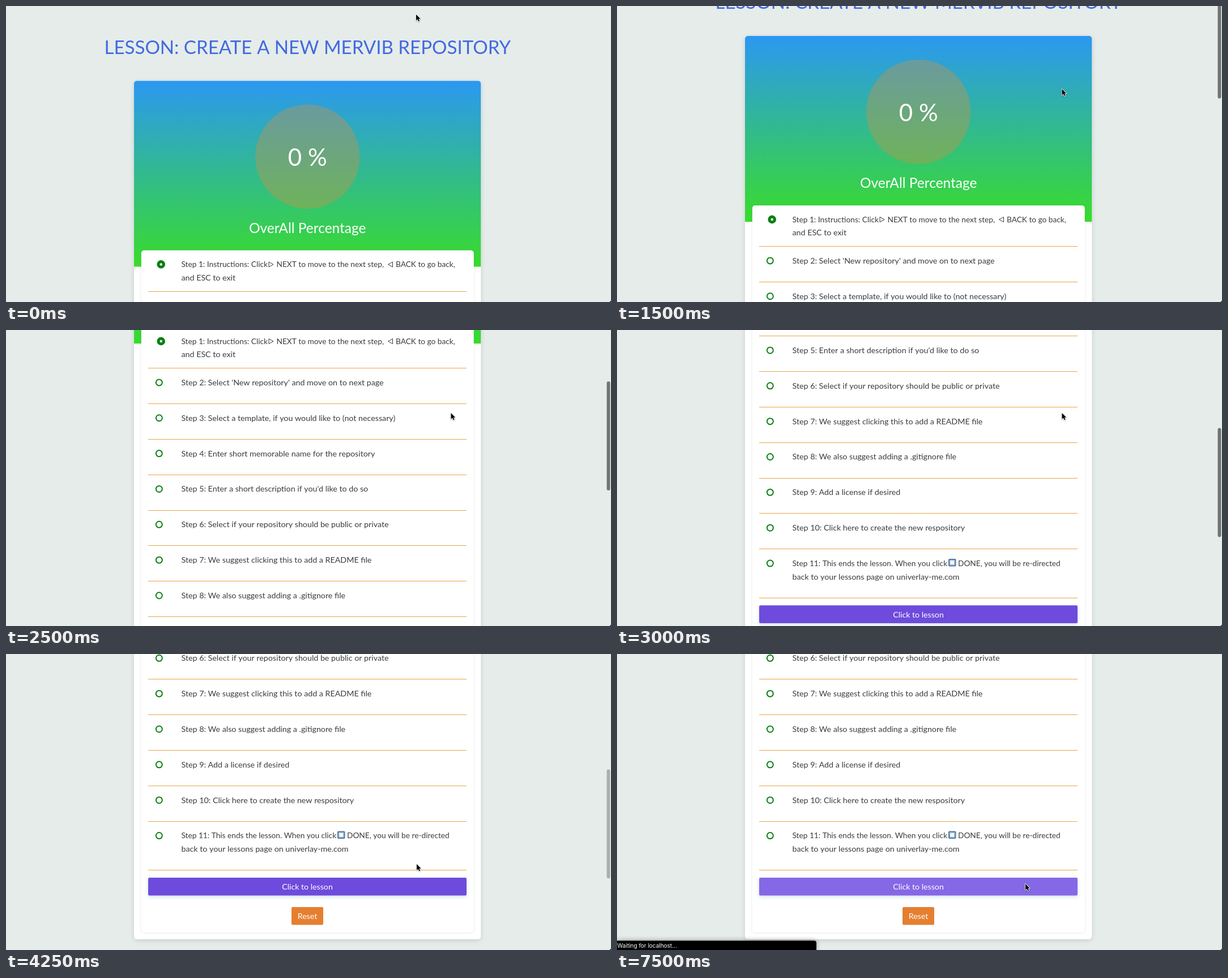
These frames come from a looping animation (1068 px wide and 524 px high, 8000 ms). An HTML page with a canvas:

```html
<!DOCTYPE html>
<html lang="en">
<head>
<meta charset="utf-8">
<title>Lesson checklist</title>
<style>
  html, body { margin: 0; width: 100%; height: 100%; overflow: hidden; background: #e5ecea; }
  canvas { display: block; }
</style>
</head>
<body>
<canvas id="stage" width="1068" height="524"></canvas>
<script>
const W = 1068, H = 524, LOOP = 8000, TICK = 250;
const ctx = document.getElementById('stage').getContext('2d');
const FACE = 'Lato, "Open Sans", sans-serif';
const INK = '#383c41', GREEN = '#0b8013', AMBER = '#e9a548';

const MID = 532.25, FIRST_ROW = 530.4, ROW = 62.85;
const steps = [
  "Step 2: Select 'New repository' and move on to next page",
  'Step 3: Select a template, if you would like to (not necessary)',
  'Step 4: Enter short memorable name for the repository',
  "Step 5: Enter a short description if you'd like to do so",
  'Step 6: Select if your repository should be public or private',
  'Step 7: We suggest clicking this to add a README file',
  'Step 8: We also suggest adding a .gitignore file',
  'Step 9: Add a license if desired',
  'Step 10: Click here to create the new respository'
];

const scrollKeys = [
  [0, 0], [1500, 79.5], [1750, 178], [2000, 267.5], [2250, 356], [2500, 437.5],
  [2750, 556], [3000, 683], [3250, 747], [3500, 759.5], [3750, 774.5]
];
const pointerKeys = [
  [0, 724, 15], [250, 732, 39], [500, 733, 39], [1000, 785.5, 147],
  [4250, 725, 372], [4500, 720.5, 403], [4750, 721, 407]
];
const barKeys = [[0, 0], [1500, 1], [4250, 0.5], [4500, 0]];

let scroll = 0;

function at(keys, t) {
  let hit = keys[0];
  for (const key of keys) if (key[0] <= t) hit = key;
  return hit;
}

function text(str, x, y, size, color, align = 'left', face = FACE) {
  ctx.font = `${size}px ${face}`;
  ctx.textAlign = align;
  ctx.fillStyle = color;
  ctx.fillText(str, x, y);
}

const label = (str, x, y, size = 14.25) => text(str, x, y, size, INK);
// pieces of a line that leave room for a symbol
const piece = (str, x, y) => label(str, x, y, 13.7);

function box(x, y, w, h, r, fill, shadow, blur = 0, dy = 0) {
  ctx.save();
  if (shadow) {
    ctx.shadowColor = shadow;
    ctx.shadowBlur = blur;
    ctx.shadowOffsetY = dy;
  }
  ctx.fillStyle = fill;
  ctx.beginPath();
  ctx.roundRect(x, y, w, h, r);
  ctx.fill();
  ctx.restore();
}

function disc(x, y, r, fill) {
  ctx.fillStyle = fill;
  ctx.beginPath();
  ctx.arc(x, y, r, 0, Math.PI * 2);
  ctx.fill();
}

function ring(y) {
  ctx.strokeStyle = GREEN;
  ctx.lineWidth = 2;
  ctx.beginPath();
  ctx.arc(270.3, y, 5.5, 0, Math.PI * 2);
  ctx.stroke();
}

// Separators snap to whole screen rows
function rule(y) {
  ctx.fillStyle = AMBER;
  ctx.fillRect(251, Math.floor(y - scroll) + scroll, 562, 1);
}

function arrow(base, tip, y) {
  ctx.strokeStyle = INK;
  ctx.lineWidth = 1;
  ctx.beginPath();
  ctx.moveTo(base, y - 4.5);
  ctx.lineTo(tip, y);
  ctx.lineTo(base, y + 4.5);
  ctx.closePath();
  ctx.stroke();
}

function header() {
  text('LESSON: CREATE A NEW MERVIB REPOSITORY', MID, 84.5, 33.1, '#4169e1', 'center');
  box(226, 132.5, 612.3, 1147, 5, '#fff', 'rgba(0,0,0,0.13)', 8, 2);
  const sky = ctx.createLinearGradient(0, 132.5, 0, 461.5);
  sky.addColorStop(0, '#2b98f1');
  sky.addColorStop(1, '#39dc2b');
  box(226, 132.5, 612.3, 329, [5, 5, 0, 0], sky);
  disc(MID, 266.7, 92.2, 'rgba(205,145,66,0.38)');
  text('0 %', MID, 283, 42, '#fff', 'center');
  text('OverAll Percentage', MID, 401.5, 24.5, '#fff', 'center');
}

function list() {
  box(238.8, 432.5, 587, 835, 5, '#fff', 'rgba(0,0,0,0.09)', 5, 0.5);

  disc(273.7, 457.4, 7.3, GREEN);
  disc(273.7, 457.4, 2.2, '#fff');
  piece('Step 1: Instructions: Click', 309.5, 462);
  arrow(464, 472, 457.5);
  piece('NEXT to move to the next step,', 477.5, 462);
  arrow(682.5, 674.5, 457.5);
  piece('BACK to go back,', 688, 462);
  label('and ESC to exit', 309.5, 485.7);
  rule(505.1);

  steps.forEach((step, i) => {
    const y = FIRST_ROW + i * ROW;
    ring(y);
    label(step, 309.5, y + 4.9);
    rule(y + 37.55);
  });

  const y = FIRST_ROW + steps.length * ROW;
  ring(y);
  piece('Step 11: This ends the lesson. When you click', 309.5, y + 4.9);
  box(585, y - 8, 13.5, 13.5, 2, '#577a9f');
  box(587, y - 6, 9.5, 9.5, 1, '#a9c4dc');
  box(588.5, y - 4.5, 6.5, 6.5, 0.5, '#f4f8fb');
  piece('DONE, you will be re-directed', 602, y + 4.9);
  label('back to your lessons page on univerlay-me.com', 309.5, y + 28.5);
  rule(1157);
}

function buttons(hover) {
  box(251, 1170.5, 562, 31.5, 2, hover ? '#8468e6' : '#6e4bdc', 'rgba(70,150,190,0.3)', 7, 2);
  text('Click to lesson', 532, 1191.5, 14.2, '#fff', 'center');
  box(504, 1222.5, 56, 31.5, 2, '#e57f30');
  text('Reset', 532, 1243.5, 14.2, '#fff', 'center');
}

function pointer(x, y) {
  const outline = [[0, 0], [0, 12.2], [2.8, 9.6], [4.8, 14], [6.9, 13.1], [5, 8.8], [8.8, 8.7]];
  ctx.save();
  ctx.translate(x, y);
  ctx.scale(0.88, 0.88);
  ctx.beginPath();
  outline.forEach(([px, py]) => ctx.lineTo(px, py));
  ctx.closePath();
  ctx.lineJoin = 'round';
  ctx.shadowColor = 'rgba(0,0,0,0.3)';
  ctx.shadowBlur = 2;
  ctx.shadowOffsetY = 1;
  ctx.strokeStyle = '#fff';
  ctx.lineWidth = 1.8;
  ctx.stroke();
  ctx.shadowColor = 'transparent';
  ctx.fillStyle = '#000';
  ctx.fill();
  ctx.restore();
}

function scrollbar(alpha) {
  if (!alpha) return;
  ctx.globalAlpha = alpha;
  box(1060.5, 0.336 * scroll - 55.9, 6, 193, 3, '#707473');
  ctx.globalAlpha = 1;
}

function statusBar() {
  box(0, 507.5, 352, 17, [0, 4, 0, 0], '#000', 'rgba(0,0,0,0.4)', 9);
  text('Waiting for localhost...', 0.5, 520, 10, '#fff', 'left', 'Inter, Roboto, sans-serif');
}

function draw(t) {
  scroll = at(scrollKeys, t)[1];
  const [, px, py] = at(pointerKeys, t);
  ctx.fillStyle = '#e5ecea';
  ctx.fillRect(0, 0, W, H);

  ctx.save();
  ctx.translate(0, -scroll);
  header();
  list();
  buttons(t >= 4750);
  ctx.restore();

  scrollbar(at(barKeys, t)[1]);
  if (t >= 5000) statusBar();
  pointer(px, py);

  // rounded window corner
  ctx.fillStyle = '#22282a';
  ctx.beginPath();
  ctx.moveTo(W, H - 2.5);
  ctx.lineTo(W, H);
  ctx.lineTo(W - 2.5, H);
  ctx.fill();
}

const start = performance.now();
function loop() {
  const t = (performance.now() - start) % LOOP;
  draw(Math.floor(t / TICK) * TICK);
  requestAnimationFrame(loop);
}
loop();
</script>
</body>
</html>
```
